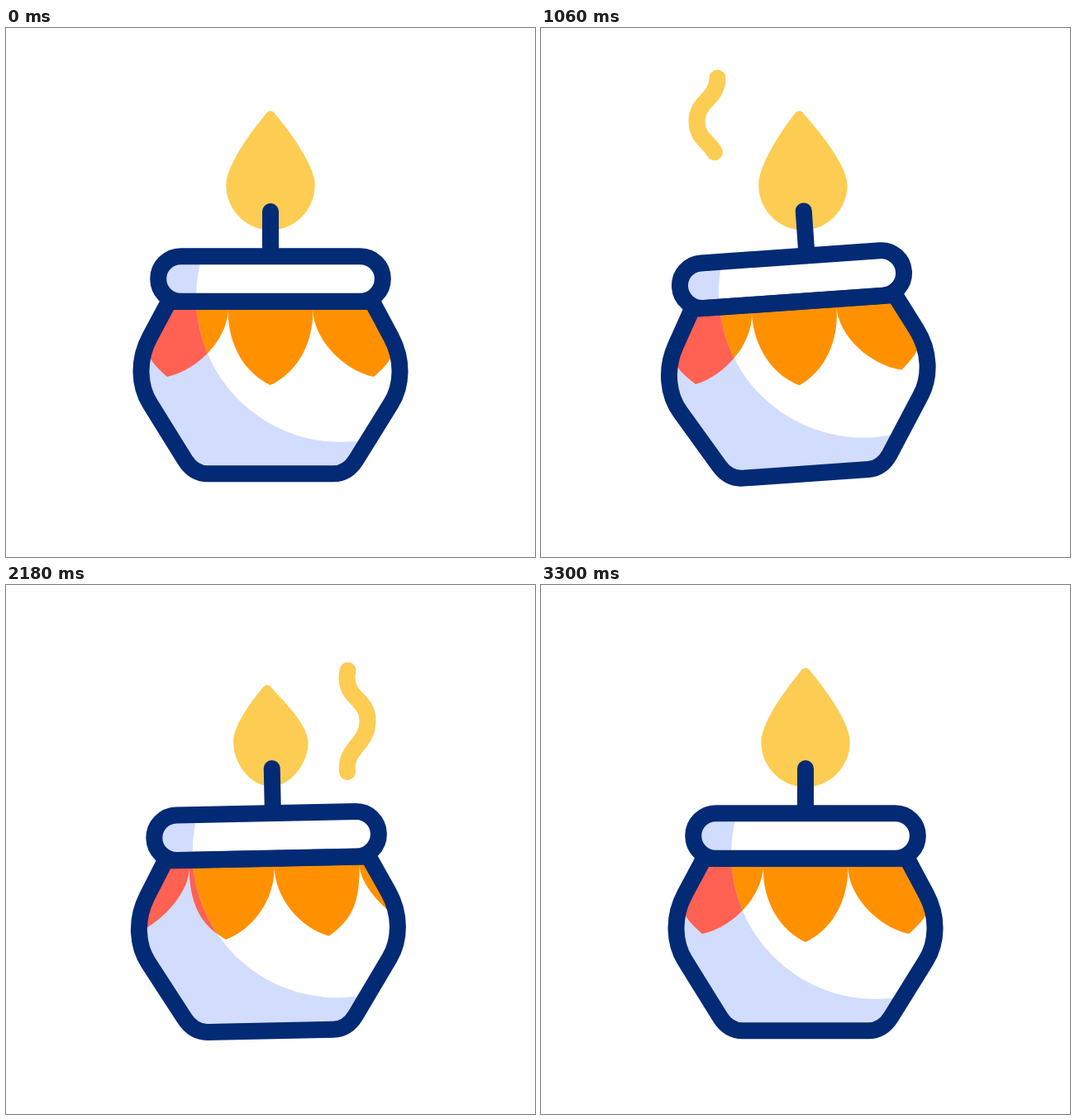
These frames come from a looping animation (640 by 640 pixels, 3.32 s). An HTML page:

```html
<!DOCTYPE html>
<html lang="en">
<head>
<meta charset="utf-8">
<title>Candle jar</title>
<style>
  html, body { margin: 0; width: 100%; height: 100%; overflow: hidden; background: #fff; }
  svg { display: block; width: 100%; height: 100%; }
  .line { fill: none; stroke: #032a75; stroke-width: 20; stroke-linecap: round; stroke-linejoin: round; }
  .smoke { fill: none; stroke: #fdcc52; stroke-width: 20; stroke-linecap: round; }
</style>
</head>
<body>
<svg viewBox="0 0 640 640">
  <defs>
    <path id="pot" d="M197 331L174 374C159 402 161 433 174 454L216.5 522.5Q227 539.3 244 539.3H396Q413 539.3 423.5 522.5L466 454C479 433 481 402 466 374L443 331Z"/>
    <rect id="lid" x="184.2" y="276.2" width="271.6" height="54.6" rx="27.3"/>
    <path id="petals"/>
    <clipPath id="inPot"><use href="#pot"/></clipPath>
    <clipPath id="inJar"><use href="#pot"/><use href="#lid"/></clipPath>
    <clipPath id="inShade">
      <path clip-rule="evenodd" d="M0 0H640V640H0ZM230 326a175 175 0 1 0 350 0a175 175 0 1 0 -350 0Z"/>
    </clipPath>
  </defs>
  <path class="smoke" pathLength="1" transform="translate(-224 1)"/>
  <path class="smoke" pathLength="1"/>
  <path id="flame" fill="#fdcc52"/>
  <g id="jar">
    <g clip-path="url(#inJar)">
      <rect width="640" height="640" fill="#fff"/>
      <g clip-path="url(#inPot)"><use href="#petals" fill="#ff9100"/></g>
      <g clip-path="url(#inShade)">
        <rect width="640" height="640" fill="#d2dcfd"/>
        <g clip-path="url(#inPot)"><use href="#petals" fill="#ff6152"/></g>
      </g>
    </g>
    <use href="#pot" class="line"/>
    <use href="#lid" class="line"/>
    <path id="wick" class="line" d="M320 222V276"/>
  </g>
</svg>
<script>
const LOOP = 3320, PIVOT = 540;
const $ = id => document.getElementById(id);
const smokes = document.querySelectorAll('.smoke');
smokes.forEach(s => s.setAttribute('d',
  'M413 226c-3 -30 24.5 -32 24.5 -62c0 -26 -25 -26 -25 -52s25 -26 25 -52.5'));

const ease = (t, from, to) => {
  const u = Math.min(1, Math.max(0, (t - from) / (to - from)));
  return u * u * (3 - 2 * u);
};

// Eased value through [time, value] keys
const track = (t, ...keys) => keys.slice(1).reduce(
  (v, [time, value], i) => v + (value - keys[i][1]) * ease(t, keys[i][0], time), keys[0][1]);

// n is the petal's place around the pot; 0 faces front
function petal(n) {
  const tipX = 320 + 125 * n, tipY = 432 - 10 * Math.min(1, Math.abs(n));
  const left = 320 + 103 * (n - .5), right = left + 103;
  return `M${left} 325V341C${left} ${385 - 10 * n} ${tipX - 30 - 8 * n} ${tipY - 14 + 6 * n} ${tipX} ${tipY}` +
    `C${tipX + 30 - 8 * n} ${tipY - 14 - 6 * n} ${right} ${385 + 10 * n} ${right} 341V325Z`;
}

function flame(x, lean, shrink) {
  const cx = x + lean * .28, half = 53.7 - 8.5 * shrink;
  const tipX = x + lean, top = 100 + 21 * shrink, k = half * .552;
  const l = cx - half, r = cx + half, bottom = 244.5 - shrink;
  const shoulder = top + 15, side = 190 - 27 * (1 - .2 * shrink);
  return `M${l} 190C${l} ${side} ${tipX - 15} ${shoulder} ${tipX - 4} ${top + 2}` +
    `Q${tipX} ${top - 1.5} ${tipX + 4} ${top + 2}` +
    `C${tipX + 15} ${shoulder} ${r} ${side} ${r} 190` +
    `C${r} ${190 + k} ${cx + k} ${bottom} ${cx} ${bottom}S${l} ${190 + k} ${l} 190Z`;
}

function drawSmoke(el, t) {
  const head = ease(t, 0, 550), tail = ease(t, 365, 992);
  el.style.display = head > 0 && tail < 1 ? '' : 'none';
  el.setAttribute('stroke-dasharray', `${head - tail} 2`);
  el.setAttribute('stroke-dashoffset', -tail);
}

function draw(t) {
  const angle = track(t, [0, 0], [690, -4], [1810, -4], [2710, 3.6], [3320, 0]);
  const slide = track(t, [0, 0], [690, 20], [1810, 20], [2710, -11.5], [3320, 0]);
  const turn = track(t, [0, 0], [740, 1], [1804, 1], [2654, 0]);
  const lean = track(t, [0, 0], [650, 0], [1580, -15], [1760, -15], [2760, 8.2], [3320, 0]);
  const shrink = track(t, [0, 0], [1130, 0], [2250, 1], [2290, 1], [3320, 0]);

  $('jar').setAttribute('transform', `rotate(${angle} 320 ${PIVOT})`);
  $('wick').setAttribute('transform', `translate(${slide})`);
  $('petals').setAttribute('d', [-3, -2, -1, 0, 1, 2].map(n => petal(n + turn)).join(''));

  const a = angle * Math.PI / 180;
  const baseX = 320 + slide * Math.cos(a) + (PIVOT - 235) * Math.sin(a);
  $('flame').setAttribute('d', flame(baseX, lean, shrink));

  drawSmoke(smokes[0], t - 405);
  drawSmoke(smokes[1], t - 1820);
}

const start = performance.now();
(function tick() {
  draw((performance.now() - start) % LOOP);
  requestAnimationFrame(tick);
})();
</script>
</body>
</html>
```
